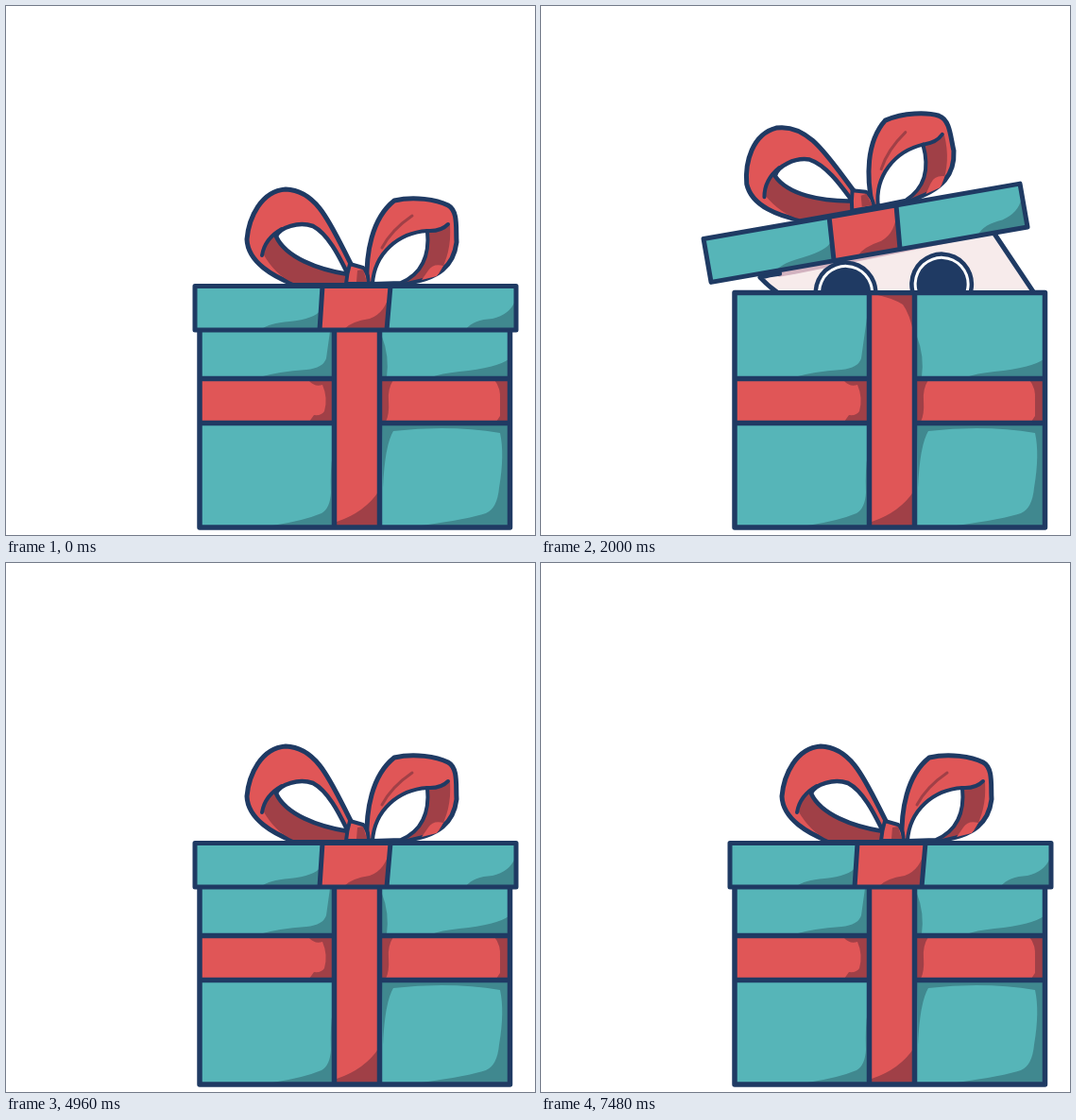
An HTML page with a canvas that plays this animation: 560 px wide and 560 px high, repeating every 7.88 s.

```html
<!DOCTYPE html>
<html lang="en">
<head>
<meta charset="utf-8">
<title>Cat in a gift box</title>
<style>
html, body { margin: 0; height: 100%; overflow: hidden; background: #fff; }
canvas { display: block; }
</style>
</head>
<body>
<canvas id="stage" width="560" height="560"></canvas>
<script>
const ctx = document.getElementById('stage').getContext('2d');
const NAVY = '#1f3a63', TEAL = '#56b5b8', TEAL_DARK = '#40888f', RED = '#e05657',
  RED_DARK = '#a04047', FUR = '#f7ebeb', BLUSH = '#dfa6b2', MAUVE = '#d3b3c0';
const LOOP = 7880, STEP = 40, RIM = 301;

// lid: centre and angle; head: midpoint of the eyes and angle; out: how far the cat is out
const closed = { lid: [370, 319.5, 0], head: [373, 388, 47.5], out: 0 };
const hop = { ...closed, lid: [367.5, 284.5, -2.85] };
const peek = { lid: [343.5, 240, -9.9], head: [373, 298.5, 47.5], out: 0 };
const high = { lid: [343.5, 191, -9.9], head: [373, 249.5, 47.5], out: 0 };
const popped = { lid: [167.5, 167.5, -57], head: [250.5, 170.5, 0], out: 1 };
const keys = [
  [0, closed], [520, closed], [680, hop], [720, hop], [1040, closed],
  [1400, closed], [2000, peek], [2680, peek], [3200, closed],
  [3960, closed], [4160, peek], [4360, high], [4760, closed],
  [5400, closed], [5520, popped], [7040, popped], [7480, closed], [LOOP, closed]
];

function poseAt(t) {
  const i = keys.findIndex(k => k[0] > t);
  const [t0, a] = keys[i - 1], [t1, b] = keys[i];
  const u = (t - t0) / (t1 - t0), e = u * u * (3 - 2 * u);
  const mix = (x, y) => x + (y - x) * e;
  return {
    lid: a.lid.map((v, n) => mix(v, b.lid[n])),
    head: a.head.map((v, n) => mix(v, b.head[n])),
    out: mix(a.out, b.out)
  };
}

function wobbleAt(t) {
  const u = (t - 5520) / 520;
  return u > 0 && u < 1 ? Math.sin(u * Math.PI * 4) * (1 - u) : 0;
}

function paint(d, fill, width = 0, stroke = NAVY) {
  const path = new Path2D(d);
  if (fill) { ctx.fillStyle = fill; ctx.fill(path); }
  if (width) { ctx.lineWidth = width; ctx.strokeStyle = stroke; ctx.stroke(path); }
}

function disc(x, y, r, fill) {
  ctx.beginPath();
  ctx.arc(x, y, r, 0, Math.PI * 2);
  ctx.fillStyle = fill;
  ctx.fill();
}

function group(draw) { ctx.save(); draw(); ctx.restore(); }

function clipAbove(y) {
  ctx.beginPath();
  ctx.rect(0, 0, 560, y);
  ctx.clip();
}

function turn(x, y, degrees) {
  ctx.translate(x, y);
  ctx.rotate(degrees * Math.PI / 180);
}

// Jagged fur line with slightly bent edges
function fur(text) {
  const pts = text.split(' ').map(p => p.split(',').map(Number));
  return pts.slice(1).map(([x, y], i) => {
    const [px, py] = pts[i], dx = x - px, dy = y - py;
    return `Q${(px + x) / 2 + dy * .05} ${(py + y) / 2 - dx * .05} ${x} ${y}`;
  }).join('');
}
const crown = 'L360 65' + fur('360,65 354,82 378,78 373,100 406,100 399,125 436,142 415,172');
const jaw = fur('393,224 378,241 366,241 368,256 356,264 352,285 327,273 323,281 302,262');
const chin = fur('290,297 271,311 254,329 246,313 230,327 228,304 204,318 203,276 183,294 172,264 147,267 158,249');
const back = fur('415,172 446,170 432,194 452,198 448,207 473,222 470,228 502,240 493,258 521,276 510,290 525,301');

function drawBody(wobble) {
  group(() => {
    turn(498, 258, wobble * 4);
    ctx.translate(-498, -258);
    const tuft = 'Q468 108 473 82Q479 78 487 88Q482 60 489 42Q498 44 500 60Q502 28 517 8Q527 25 522 50L523 74Q530 77 535 82Q535 98 526 106Q526 118 521 132';
    const tail = 'M492 256C498 215 496 180 482 145' + tuft + 'C504 180 514 220 503 258';
    paint(tail, FUR);
    paint('M482 145' + tuft + 'L508 130L498 134L490 146Z', RED);
    paint('M493 235Q500 222 508 228L502 256H493Z', MAUVE);
    paint(tail, null, 5);
  });
  paint('M285 303L300 220L380 130L415 172' + back + 'V303Z', FUR);
  paint('M290 303L302 288L350 288L368 262L378 252L383 275L380 303Z', MAUVE);
  paint('M410 165L400 187L430 191L440 177L416 172ZM505 284L520 277L510 290L525 301H504Z', MAUVE);
  paint('M415 172' + back, null, 5);
}

function drawBox() {
  const outline = 'M205 303.5H533.5V552H205Z';
  paint(outline, TEAL);
  paint('M345 330L339 373Q336 383 318 385Q288 387 268 393H346ZM398 350Q406 370 403 393H398ZM532 374Q520 383 480 387Q460 389 450 393H532Z', TEAL_DARK);
  paint('M346 474Q343 490 344 515Q343 532 334 537Q315 545 282 550H346Z', TEAL_DARK);
  paint('M398 443H532V550H440Q490 543 508 537Q520 532 522 510Q528 475 523 452Q470 443 410 450Q401 465 399 510Z', TEAL_DARK);
  paint('M205 395H533V441H205ZM348 304H395V551H348Z', RED);
  paint('M346 396H320Q327 404 335 401Q341 415 337 429Q334 434 326 433L321 440H346ZM398 396H410Q404 405 405 418Q406 432 402 440H398ZM532 396H517Q524 404 523 418V434L519 440H532Z', RED_DARK);
  paint('M352 305H395V348Q390 325 383 316Q372 309 352 305ZM395 513Q380 536 350 546V550H395Z', RED_DARK);
  paint('M205 394.5H347M396 394.5H533M205 441.5H347M396 441.5H533M347.5 304V551M395.5 304V551' + outline, null, 5.5);
}

function drawEye(x, y) {
  disc(x, y, 34, NAVY);
  disc(x, y, 29.5, '#fff');
  disc(x, y, 26.5, NAVY);
}

function drawHead() {
  paint('M262 50L275 52' + crown + 'L393 224' + jaw + 'L290 297' + chin + 'Z', FUR);
  paint('M268 55L278 57L170 236L160 252L148 252Z', MAUVE);
  paint('M183 292L192 280L216 282L222 305L204 316L203 275ZM250 325L246 308L254 288L266 288L268 304ZM322 281L327 273L344 278L360 252L370 250L356 264L352 285Z', MAUVE);
  paint('M262 50L275 52' + crown, null, 5);
  paint('M393 224' + jaw, null, 5);
  paint('M290 297' + chin, null, 5);
  disc(347, 149, 18, BLUSH);
  disc(262, 266, 18, BLUSH);
  disc(281, 191, 15, BLUSH);
  disc(286, 192, 7.5, NAVY);
  paint('M282 222L298 212L295 203L301 194L314 195L312 181M339 141L333 149M351 142L341 159M361 152L352 160M256 261L250 270M267 261L260 278M277 264L271 283', null, 4.5);
  drawEye(282, 130);
  drawEye(220, 211);
}

function drawLid() {
  ctx.translate(-370, -319.5);
  // left loop
  paint('M303 294C285 287 256 272 255 247C257 224 270 196 296 194C330 195 344 232 366 275L362 294Z', RED, 5);
  paint('M272 262Q276 248 286 242C292 262 325 280 361 283L360 293H304Q285 285 272 262Z', RED_DARK);
  paint('M286 244C290 234 310 228 325 233C342 242 354 268 362 284C330 279 296 266 286 244Z', '#fff', 4.5);
  paint('M271 264Q274 246 292 236', null, 4);
  // right loop
  paint('M382 294C381 262 387 225 411 206C432 201 456 205 468 211C479 217 476 236 477 250C474 274 460 289 420 294Z', RED, 5);
  paint('M446 239Q460 240 470 232Q472 262 458 284L420 293Q447 277 446 239Z', RED_DARK);
  paint('M447 280Q452 272 463 275L456 286L440 290Z', RED);
  paint('M388 294C390 262 415 240 446 238C448 258 444 282 418 293Z', '#fff', 4);
  paint('M446 238Q460 239 468 231', null, 4);
  paint('M430 222Q408 237 398 256', null, 3, RED_DARK);
  // knot
  paint('M364 273L378 277Q385 285 383 294H360Q361 283 364 273Z', RED, 4);
  paint('M372 280L378 279L382 292H371Z', RED_DARK);
  // slab
  paint('M200 296.5H540V343H200Z', TEAL);
  paint('M333 322Q327 331 300 334Q278 336 271 342H332ZM539 312Q533 327 515 331Q495 332 487 342H539Z', TEAL_DARK);
  paint('M335 296.5H407L403 343H332Z', RED);
  paint('M406 303Q402 325 385 331Q365 334 358 342H403Z', RED_DARK);
  paint('M335 296.5L332 343M407 296.5L403 343M200 296.5H540V343H200Z', null, 5);
}

function drawPaw() {
  paint('M474 306L486 307Q487 345 465 361Q430 376 406 352L420 306Z', TEAL_DARK);
  paint('M402 298Q410 272 438 270Q468 270 474 292C477 315 466 345 455 352Q440 362 425 358Q402 352 400 335Q396 315 402 298Z', FUR, 5);
  paint('M421 333L421 356M442 333L444 356', null, 4.5);
}

function render(t) {
  const { lid, head, out } = poseAt(t), wobble = wobbleAt(t);
  ctx.clearRect(0, 0, 560, 560);
  ctx.lineJoin = ctx.lineCap = 'round';
  if (out) group(() => {
    clipAbove(RIM);
    ctx.translate(0, 300 * (1 - out));
    drawBody(wobble);
  });
  drawBox();
  if (out) group(() => {
    ctx.globalAlpha = out;
    paint('M208 306H288Q284 324 262 330L225 327L208 322Z', TEAL_DARK);
  });
  const sway = () => {
    turn(330, 300, wobble * 1.2);
    ctx.translate(-330, -300);
  };
  group(() => {
    clipAbove(RIM + 90 * out);
    sway();
    turn(...head);
    ctx.translate(-250.5, -170.5);
    drawHead();
  });
  group(() => {
    sway();
    turn(...lid);
    drawLid();
  });
  if (out) group(() => {
    ctx.translate(437, RIM);
    ctx.scale(out, out);
    ctx.translate(-437, -RIM);
    drawPaw();
  });
}

const start = performance.now();
function tick() {
  const t = (performance.now() - start) % LOOP;
  render(Math.floor(t / STEP) * STEP);
  requestAnimationFrame(tick);
}
tick();
</script>
</body>
</html>
```
